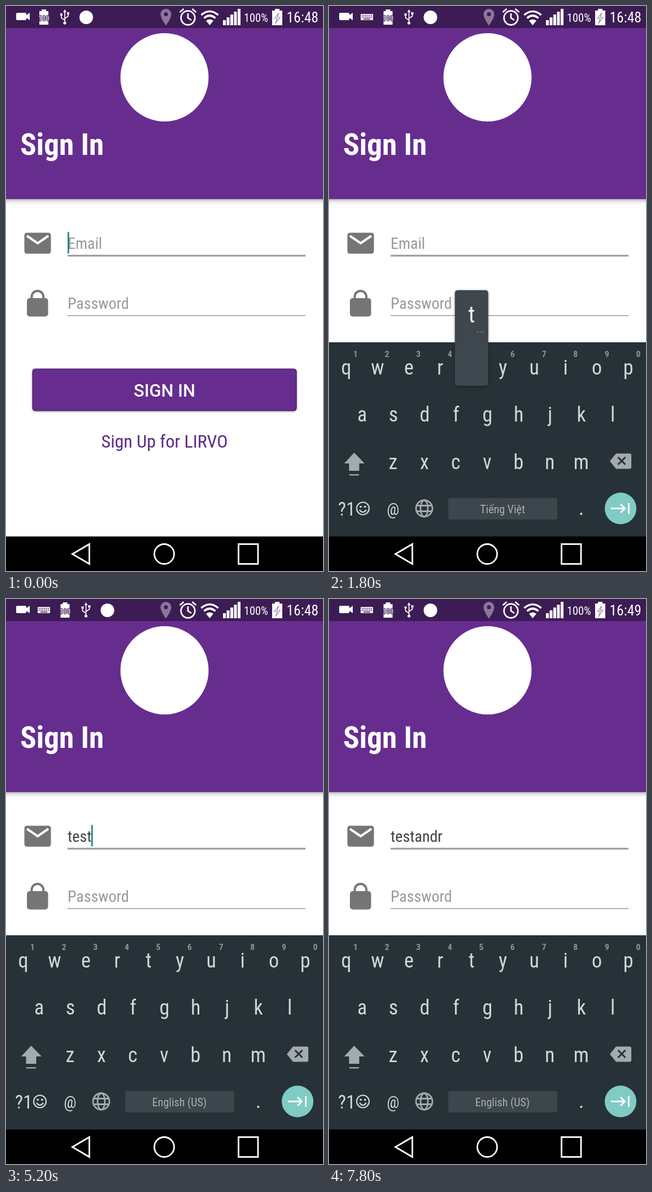
Recreate the animation shown at these times as an HTML page. Size 561x998 px, loop 8 s.

```html
<!DOCTYPE html>
<html lang="en">
<head>
<meta charset="utf-8">
<title>Sign in</title>
<style>
  html, body { margin: 0; width: 100%; height: 100%; overflow: hidden; background: #fff; }
  svg { display: block; width: 561px; height: 998px; }
  text { font-family: "Roboto Condensed", Roboto, sans-serif; font-stretch: 75%; white-space: pre; }
  .wide { font-family: Roboto, sans-serif; font-stretch: 100%; }
  .mid { text-anchor: middle; }
  .line { fill: none; stroke: #fff; }
  .key { font-size: 36px; fill: #d2d6d8; text-anchor: middle; }
  .hint { font-size: 15.5px; font-weight: 700; fill: #8b9397; text-anchor: middle; }
  .field { font-size: 28px; fill: #9a9a9a; }
</style>
</head>
<body>
<svg viewBox="0 0 561 998">
  <defs>
    <filter id="soft" x="-20%" y="-20%" width="140%" height="140%"><feGaussianBlur stdDeviation="2"/></filter>
    <linearGradient id="shade" x2="0" y2="1">
      <stop stop-color="#000" stop-opacity=".3"/>
      <stop offset=".4" stop-color="#000" stop-opacity=".1"/>
      <stop offset="1" stop-color="#000" stop-opacity="0"/>
    </linearGradient>
  </defs>

  <!-- header -->
  <rect width="561" height="998" fill="#fff"/>
  <rect y="341" width="561" height="10" fill="url(#shade)"/>
  <rect width="561" height="341" fill="#662d8e"/>
  <rect width="561" height="39" fill="#3d1c55"/>
  <circle cx="280.5" cy="126" r="78" fill="#fff"/>
  <text x="25" y="263" font-size="53.300" font-weight="700" fill="#fff">Sign In</text>

  <!-- status bar -->
  <path d="M20 12h14q2 0 2 2v2l6-4v13l-6-4v2q0 2-2 2H20q-2 0-2-2v-9q0-2 2-2z" fill="#fff"/>
  <g id="kbIcon">
    <rect x="56" y="14" width="22" height="11" rx="1" fill="#fff" opacity=".9"/>
    <path d="M58 17h18M58 20h18" stroke="#3d1c55" stroke-width="1.6" stroke-dasharray="1.6 1.6"/>
    <path d="M61 23h12" stroke="#3d1c55" stroke-width="1.4"/>
  </g>
  <g id="tray">
    <path d="M63 6h8v3h4v24H59V9h4z" fill="#fff"/>
    <text class="mid" x="67" y="26" font-size="13" fill="#fff" stroke="#3d1c55" stroke-width="2" paint-order="stroke">100</text>
    <g class="line" stroke-width="1.7">
      <path d="M104 9v20M104 25l-6-4v-5M104 22l6-4v-4"/>
    </g>
    <path d="M104 6l-3 5h6zM96 13h4v4h-4zM108 11h4v4h-4z" fill="#fff"/>
    <circle cx="104" cy="30" r="2.6" fill="#fff"/>
    <circle cx="142" cy="20" r="12" fill="#fff"/>
  </g>
  <path d="M283 5a9.500 9.500 0 0 1 9.500 9.500c0 7-9.500 20-9.500 20s-9.500-13-9.500-20a9.500 9.500 0 0 1 9.500-9.500zm0 6a3.500 3.500 0 1 0 0 7 3.500 3.500 0 0 0 0-7z" fill="#8b7799"/>
  <g class="line" stroke-width="2.7">
    <circle cx="322" cy="21" r="12.300"/>
    <path d="M322 13v8l6 4M307.500 11l7-6M336.500 11l-7-6"/>
    <path d="M345.500 16q15-13 30 0M350.500 21.500q10-9 20 0" stroke-width="3.600"/>
  </g>
  <path d="M354 26q6.500-5 13 0l-6.500 8z" fill="#fff"/>
  <path d="M384 25h5v9h-5zM390.500 20h5v14h-5zM397 15h5v19h-5zM403.500 10h5v24h-5zM410 5h5v29h-5z" fill="#fff"/>
  <text x="421" y="27.500" font-size="20.300" fill="#fff">100%</text>
  <path d="M476 5h8v3h5v26h-18V8h5z" fill="#fff"/>
  <path d="M483 12l-8 10h5l-3 9 8-11h-5z" fill="none" stroke="#9a86a8" stroke-width="1.200"/>
  <text id="clock" x="496.500" y="29" font-size="25.500" fill="#fff"></text>

  <!-- form -->
  <rect x="32.500" y="400.500" width="47" height="37" rx="4.500" fill="#757575"/>
  <path d="M37 406l19 13 19-13" fill="none" stroke="#fff" stroke-width="4"/>
  <rect x="37" y="516" width="37.500" height="32.500" rx="5" fill="#757575"/>
  <path d="M45.500 518v-4.500a10.300 10.300 0 0 1 20.600 0v4.500" fill="none" stroke="#757575" stroke-width="4"/>
  <text id="email" class="field" x="109" y="429"></text>
  <rect id="caret" y="399" width="2.700" height="38" fill="#178a82"/>
  <rect x="109" y="439.500" width="421" height="3" fill="#999"/>
  <text class="field" x="109" y="535">Password</text>
  <rect x="109" y="546" width="421" height="1.500" fill="#999"/>
  <rect x="47" y="642" width="467" height="74" rx="5" opacity=".4" filter="url(#soft)"/>
  <rect x="47" y="641" width="467" height="74" rx="5" fill="#662d8e" stroke="#43205f" stroke-width="1.200"/>
  <text class="mid wide" x="280.500" y="690" font-size="31" font-weight="500" fill="#fff">SIGN IN</text>
  <text class="mid" x="280.500" y="780" font-size="32" fill="#5c2a86">Sign Up for LIRVO</text>

  <!-- navigation bar, with the keyboard sliding over it -->
  <rect y="937" width="561" height="61"/>
  <g id="board">
    <rect y="594" width="561" height="343" fill="#263238"/>
    <g id="keys"></g>
    <rect id="press" x="145" y="855" width="48" height="66" rx="4" fill="#3e474d"/>
    <g fill="#a4aaad">
      <path d="M44.500 789l18.500 19h-9.500v13h-18v-13H27zM36 827h17v2.200H36z"/>
      <path d="M508 790.500h24q3 0 3 3v21q0 3-3 3h-24l-11-13.500z"/>
    </g>
    <path d="M511.500 797l13 13M524.500 797l-13 13" stroke="#263238" stroke-width="3"/>
    <text x="16" y="899.500" font-size="33.500" fill="#d2d6d8">?1</text>
    <g fill="none" stroke="#d2d6d8" stroke-width="2.200">
      <circle cx="60" cy="887.500" r="11"/>
      <path d="M54 890q6 8 12 0"/>
    </g>
    <path d="M54.500 883h3.500v3h-3.500zM62 883h3.500v3h-3.500z" fill="#d2d6d8"/>
    <text class="mid" x="113.500" y="899" font-size="29" fill="#d2d6d8">@</text>
    <g fill="none" stroke="#a4aaad" stroke-width="2.800">
      <circle cx="168.500" cy="887.500" r="14.500"/>
      <ellipse cx="168.500" cy="887.500" rx="6.500" ry="14.500"/>
      <path d="M155 882.500h27M155 892.500h27"/>
    </g>
    <rect x="211" y="869" width="193" height="38" rx="4" fill="#3d464c"/>
    <text id="lang" class="mid" x="307" y="896" font-size="20" fill="#a9afb2"></text>
    <text class="key" x="446.500" y="899">.</text>
    <circle cx="516" cy="887.500" r="28" fill="#80cbc4"/>
    <path d="M499 887.500h24M516 880l7.500 7.500-7.500 7.500M530.500 878v19" class="line" stroke-width="2.800"/>
    <g id="popup">
      <rect id="popShade" width="59" rx="5" opacity=".45" filter="url(#soft)"/>
      <rect id="popBox" width="59" rx="5" fill="#3e474e"/>
      <text id="popKey" class="mid" font-size="40" fill="#fff"></text>
      <path id="popDots" stroke="#757d82" stroke-width="2" stroke-dasharray="2 3"/>
    </g>
  </g>
  <g class="line" stroke-width="2.800">
    <path d="M117.500 968l30-17.500v35z"/>
    <circle cx="280" cy="968" r="17.500"/>
    <rect x="411.500" y="950.500" width="34.500" height="35"/>
  </g>
</svg>
<script>
  const LOOP = 8000, STEP = 55.45;
  const $ = id => document.getElementById(id);
  const set = (id, attrs) => Object.entries(attrs).forEach(([k, v]) => $(id).setAttribute(k, v));
  const show = (id, on) => $(id).style.display = on ? '' : 'none';

  // left centre and baseline of each row, then its popup's top, bottom and baseline
  const rows = [
    { keys: 'qwertyuiop', x: 30.5, y: 651, top: 502, bottom: 671, base: 559 },
    { keys: 'asdfghjkl', x: 58.5, y: 734, top: 576, bottom: 754, base: 637 },
    { keys: 'zxcvbnm', x: 113.5, y: 818, top: 659, bottom: 838, base: 720 }
  ];
  const label = (cls, x, y, s) => `<text class="${cls}" x="${x}" y="${y}">${s}</text>`;
  $('keys').innerHTML = rows.map(r => [...r.keys].map((c, i) => label('key', r.x + i * STEP, r.y, c)).join('')).join('')
    + [...'1234567890'].map((c, i) => label('hint', 47 + i * 55.6, 620, c)).join('');

  // time, text, caret visible, key held
  const typing = [
    [0, '', 1], [600, '', 0], [1000, '', 1], [1400, '', 0],
    [1800, '', 0, 't'], [2000, 't', 1, 'e'], [2200, 'te', 1, 's'], [2400, 'té', 1, 's'],
    [2600, 'té', 1], [2800, 'tes', 1], [3000, 'tes', 1, 't'], [3200, 'test', 1],
    [3600, 'test', 0], [4200, 'test', 1], [4600, 'test', 0], [5200, 'test', 1], [5600, 'test', 0],
    [6200, 'test', 1, 'a'], [6400, 'testa', 1, 'n'], [6600, 'testan', 1], [6800, 'testan', 1, 'd'],
    [7000, 'testand', 1], [7200, 'testand', 1, 'r'], [7400, 'testandr', 1], [7800, 'testandr', 0]
  ];

  function drawPopup(key) {
    show('popup', key);
    if (!key) return;
    const row = rows.find(r => r.keys.includes(key));
    const mid = row.x + row.keys.indexOf(key) * STEP;
    const box = { x: mid - 29.5, y: row.top, height: row.bottom - row.top };
    set('popBox', box);
    set('popShade', { ...box, y: row.top + 1 });
    set('popKey', { x: mid, y: row.base });
    $('popKey').textContent = key;
    set('popDots', { d: `M${mid + 10} ${row.base + 17}h12` });
    show('popDots', key !== 's');
  }

  function draw(t) {
    const [, text, caret, key] = typing.findLast(s => s[0] <= t);
    const open = t >= 600;
    const [drop, alpha] = t < 800 ? [49, .5] : t < 1000 ? [22.5, .79] : [0, 1];

    $('email').textContent = text || 'Email';
    $('email').style.fill = text ? '#424242' : '';
    set('caret', { x: 109 + (text ? $('email').getComputedTextLength() - .5 : 0) });
    show('caret', caret);

    show('board', open);
    set('board', { transform: `translate(0 ${drop})`, opacity: alpha });
    show('kbIcon', open);
    set('tray', { transform: `translate(${open ? 37.5 : 0} 0)` });
    show('press', t >= 4600 && t < 5000);
    $('lang').textContent = t < 5000 ? 'Tiếng Việt' : 'English (US)';
    $('clock').textContent = t < 7800 ? '16:48' : '16:49';
    drawPopup(key);
  }

  function frame() {
    draw(performance.now() % LOOP);
    requestAnimationFrame(frame);
  }
  frame();
</script>
</body>
</html>
```
